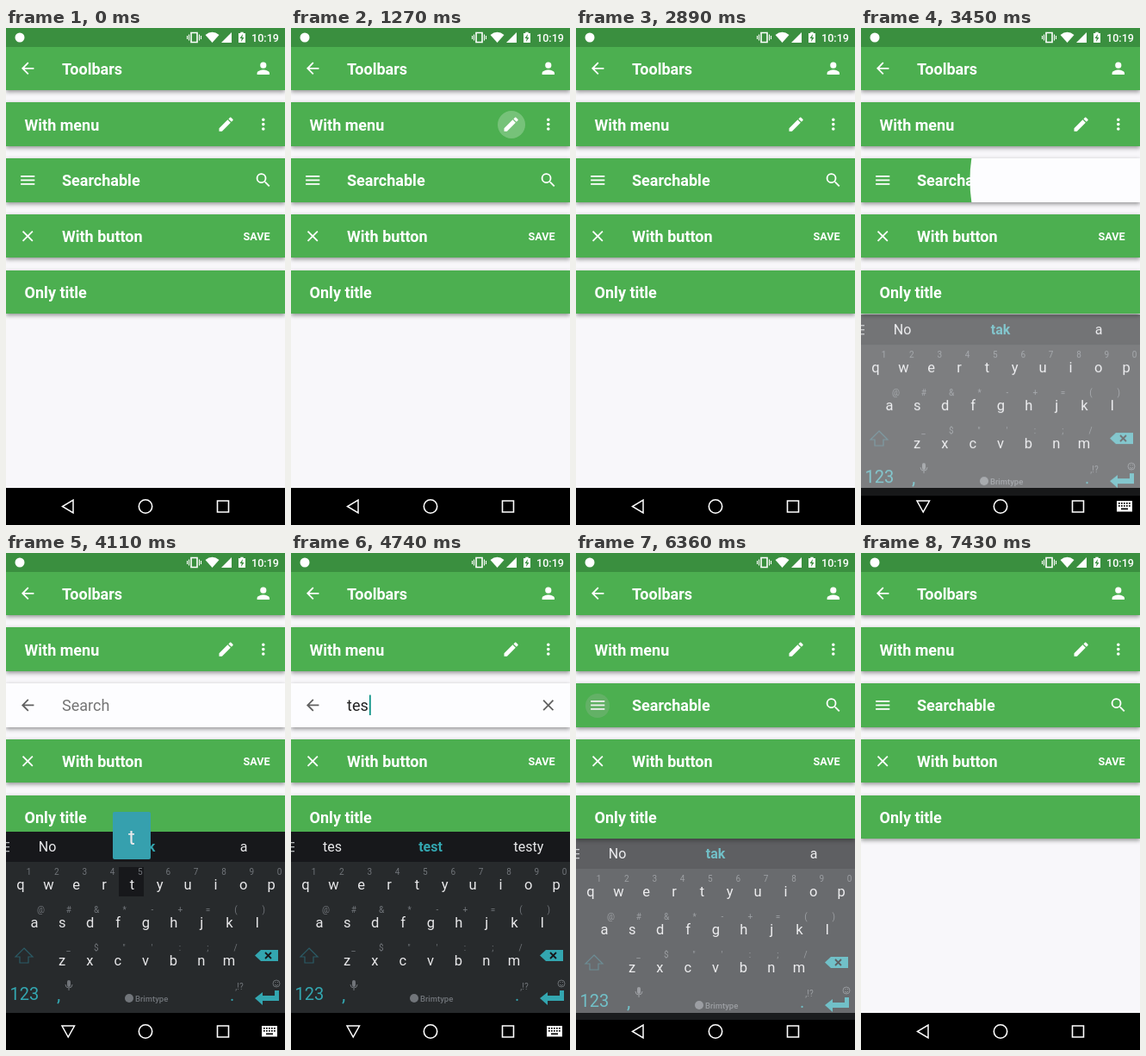
An HTML page with a canvas for the animation above (7.87 s loop, 324 px wide and 576 px high).

```html
<!DOCTYPE html>
<html lang="en">
<head>
<meta charset="utf-8">
<title>Toolbars</title>
<style>
html, body { margin: 0; width: 100%; height: 100%; overflow: hidden; background: #f8f7fa; }
canvas { display: block; width: 324px; height: 576px; }
</style>
</head>
<body>
<canvas width="324" height="576"></canvas>
<script>
const LOOP = 7870, W = 324, H = 576, NAV = 533;
const GREEN = '#4caf50', STATUS = '#3a8f3f', PAPER = '#f8f7fa', WHITE = '#fff', TEAL = '#33a6b0', INK = '#616161';
const screen = document.querySelector('canvas').getContext('2d');
const layer = Object.assign(document.createElement('canvas'), { width: W, height: H }).getContext('2d');
let ctx = screen;

const ICONS = {
  back: 'M20 11H7.83l5.59-5.59L12 4l-8 8 8 8 1.41-1.41L7.83 13H20z',
  person: 'M12 12a4 4 0 1 0 0-8a4 4 0 0 0 0 8zm0 2c-2.67 0-8 1.34-8 4v2h16v-2c0-2.66-5.33-4-8-4z',
  edit: 'M3 17.25V21h3.75L17.81 9.94l-3.75-3.75zM20.71 7.04c.39-.39.39-1.02 0-1.41l-2.34-2.34c-.39-.39-1.02-.39-1.41 0l-1.83 1.83 3.75 3.75z',
  more: 'M10 6a2 2 0 1 0 4 0a2 2 0 1 0-4 0zm0 6a2 2 0 1 0 4 0a2 2 0 1 0-4 0zm0 6a2 2 0 1 0 4 0a2 2 0 1 0-4 0z',
  menu: 'M3 18h18v-2H3zm0-5h18v-2H3zm0-7v2h18V6z',
  search: 'M15.5 14h-.79l-.28-.27A6.5 6.5 0 1 0 13.73 14.43l.27.28v.79l5 4.99L20.49 19zm-6 0a4.5 4.5 0 1 1 0-9a4.5 4.5 0 0 1 0 9z',
  close: 'M19 6.41L17.59 5 12 10.59 6.41 5 5 6.41 10.59 12 5 17.59 6.41 19 12 13.41 17.59 19 19 17.59 13.41 12z'
};
for (const name in ICONS) ICONS[name] = new Path2D(ICONS[name]);

// x, y, radius, press, release, end
const RIPPLES = [
  [25, 47, 16, 560, 720, 850],
  [299, 47, 16, 830, 990, 1120],
  [256, 112, 16, 1100, 1260, 1400],
  [299, 112, 27, 1590, 1800, 2150],
  [299, 177, 16, 3200, 3340, 3600],
  [25, 177, 14, 6090, 6290, 6700]
];

// key, x, y, press, release
const PRESSES = [
  ['t', 146, 384, 3960, 4130],
  ['e', 82, 384, 4270, 4400],
  ['s', 65, 428, 4540, 4690],
  ['t', 146, 384, 4820, 4945]
];
const CLEARED = 5550;
const HINTS = [['No', 'tak', 'a'], ['t', 'to', 'tak'], ['te', 'ten', 'też'], ['tes', 'test', 'testy'], ['testy', 'test', 'testu']];

const ROWS = [
  ['qwertyuiop', '1234567890', 17, 384],
  ['asdfghjkl', '@#&*-+=()', 33, 428],
  ['zxcvbnm', '_$"\':;/', 65, 472]
];

const clamp = v => Math.max(0, Math.min(1, v));
const part = (t, a, b) => clamp((t - a) / (b - a));
const easeOut = p => 1 - (1 - p) ** 3;
const smooth = p => p * p * (3 - 2 * p);
const within = (t, a, b) => t >= a && t < b;

function rect(x, y, w, h, color) {
  ctx.fillStyle = color;
  ctx.fillRect(x, y, w, h);
}

function text(s, x, y, size, color, weight = 400, align = 'left') {
  ctx.font = `${weight} ${size}px Roboto, sans-serif`;
  ctx.textAlign = align;
  ctx.fillStyle = color;
  ctx.fillText(s, x, y);
}

function disc(x, y, r, color) {
  ctx.fillStyle = color;
  ctx.beginPath();
  ctx.arc(x, y, r, 0, 7);
  ctx.fill();
}

function fillPath(d, color) {
  ctx.fillStyle = color;
  ctx.fill(new Path2D(d));
}

function strokePath(d, color, width) {
  ctx.strokeStyle = color;
  ctx.lineWidth = width;
  ctx.stroke(new Path2D(d));
}

function icon(name, x, y, color = WHITE) {
  ctx.save();
  ctx.translate(x - 10.8, y - 10.8);
  ctx.scale(.9, .9);
  ctx.fillStyle = color;
  ctx.fill(ICONS[name], 'evenodd');
  ctx.restore();
}

function clipped(path, draw) {
  ctx.save();
  ctx.beginPath();
  path();
  ctx.clip();
  draw();
  ctx.restore();
}

function shadow(blur, dy, alpha) {
  ctx.shadowColor = `rgba(0,0,0,${alpha})`;
  ctx.shadowBlur = blur;
  ctx.shadowOffsetY = dy;
}

function bar(i, title, left, ...right) {
  const top = 21.6 + i * 64.8, mid = top + 25.2;
  const y = Math.round(top), bottom = Math.round(top + 50.4);
  ctx.save();
  shadow(5, 2, .42);
  rect(0, y, W, bottom - y, GREEN);
  ctx.restore();
  if (left) icon(left, 25.2, mid);
  text(title, left ? 65 : 21.6, Math.round(mid + 6.9), 18, WHITE, 700);
  right.reverse().forEach((name, k) => icon(name, 298.8 - k * 43.2, mid));
}

function typedCount(t) {
  return t >= CLEARED ? 0 : PRESSES.filter(p => t >= p[4]).length;
}

function searchField(t) {
  const y = 176.4, word = 'test'.slice(0, typedCount(t));
  rect(0, 151, W, 51, '#fdfdff');
  icon('back', 25.2, y, INK);
  text(word || 'Search', 65, 183, 18, word ? '#212121' : '#757575');
  const caret = 65.2 + (word ? ctx.measureText(word).width + 1 : 0);
  if (word) icon('close', 298.8, y, INK);
  if (within(t, 3400, 3770) || within(t, 4130, 5360) || within(t, CLEARED, 6130))
    rect(caret, 164.5, 1.8, 23.5, '#0f9488');
}

function searchable(t) {
  const area = () => ctx.rect(0, 151, W, 51);
  const circle = (x, p) => () => ctx.arc(x, 176.4, 310 * smooth(p), 0, 7);
  const green = () => bar(2, 'Searchable', 'menu', 'search');
  const opening = part(t, 3330, 3555), closing = part(t, 6130, 6355);
  green();
  if (!opening || closing === 1) return;
  clipped(area, () => {
    clipped(circle(299, opening), () => searchField(t));
    if (closing) clipped(circle(25, closing), green);
  });
}

function ripples(t) {
  for (const [x, y, r, press, release, end] of RIPPLES) {
    if (!within(t, press, end)) continue;
    ctx.globalAlpha = .26 * (1 - part(t, release, end));
    disc(x, y, r * easeOut(part(t, press, release)), press === 6090 ? '#bbb' : WHITE);
  }
  ctx.globalAlpha = 1;
  if (within(t, 7040, 7430)) clipped(() => ctx.roundRect(260, 225, 62, 35, 2), () => {
    ctx.globalAlpha = .24 * (1 - part(t, 7220, 7430));
    disc(291, 242, 36 * easeOut(part(t, 7040, 7250)), WHITE);
  });
}

function popup(t) {
  if (!within(t, 1840, 2890)) return;
  const p = easeOut(part(t, 1840, 2150)), w = 176 * (.2 + .8 * p), h = 87 * p, x = W - w, y = 123;
  ctx.save();
  ctx.globalAlpha = part(t, 1840, 1940) * (1 - part(t, 2710, 2890));
  ctx.save();
  shadow(14, 5, .42);
  ctx.fillStyle = '#fdfdff';
  ctx.beginPath();
  ctx.roundRect(x, y, w, h, 2);
  ctx.fill();
  ctx.restore();
  clipped(() => ctx.rect(x, y, w, h), () => {
    if (t >= 2540) clipped(() => ctx.rect(148, y, 176, 43.5), () =>
      disc(236, 145, 95 * easeOut(part(t, 2540, 2760)), 'rgba(0,0,0,.1)'));
    text('Item 1', 162, 150, 14.4, '#212121');
    text('Item 2', 162, 193, 14.4, '#212121');
  });
  ctx.restore();
}

function keys(t) {
  const KEY = '#e8e8ea', DIM = '#71757a', STRIP = '#17181b';
  rect(0, 323, W, 35, STRIP);
  rect(0, 358, W, 175, '#272a2c');

  for (let y = 335; y < 348; y += 5) rect(0, y, 4, 1.3, '#b5b8ba');
  HINTS[typedCount(t)].forEach((s, i) => {
    const mid = i === 1;
    text(s, 48 + i * 114, 346, 16, mid ? TEAL : KEY, mid ? 700 : 400, 'center');
  });

  const pressed = PRESSES.find(p => within(t, p[3], p[4]));
  if (pressed) rect(pressed[1] - 15, pressed[2] - 20, 29, 34, STRIP);
  for (const [letters, extras, x0, y] of ROWS)
    [...letters].forEach((letter, i) => {
      const x = x0 + i * 32.35;
      text(letter, x, y + 6, 16.5, KEY, 400, 'center');
      text(extras[i], x + (y === 384 ? 9.5 : 7.5), y - 11, 10, DIM, 400, 'center');
    });

  strokePath('M21 458L31 468H26V475H16V468H11Z', '#2b5b66', 1.2);
  fillPath('M289 466.5L296 460H316V473H296Z', TEAL);
  strokePath('M301 463L308 470M308 463L301 470', STRIP, 1.8);

  text('123', 4.5, 518, 20, TEAL);
  text(',', 59, 519, 22, TEAL);
  text('.', 260, 519, 20, TEAL);
  text(',!?', 271, 506, 10, DIM, 400, 'center');
  fillPath('M71 497a2 2 0 0 1 4 0v4a2 2 0 0 1-4 0z', DIM);
  strokePath('M69 500a4 4 0 0 0 8 0M73 504v3', DIM, 1);
  disc(143, 516, 5, DIM);
  text('Brimtype', 150, 519.5, 9.5, DIM, 500);
  strokePath('M318 499a4 4 0 1 0-8 0a4 4 0 1 0 8 0M312 500q2 3 4 0M312.5 497.5h1M315 497.5h1', DIM, .9);
  fillPath('M289 516L298 509V513H312V507H317V519H298V524Z', TEAL);

  if (pressed) {
    const [letter, x, y] = pressed;
    ctx.fillStyle = '#36a0ae';
    ctx.beginPath();
    ctx.roundRect(x - 22, y - 84, 44, 55, 2);
    ctx.fill();
    text(letter, x, y - 46, 24, '#e8e8ea', 400, 'center');
  }
}

// The keyboard fades as one layer, over the navigation bar.
function keyboard(t) {
  const enter = easeOut(part(t, 3400, 3600)), exit = part(t, 6310, 6470);
  if (!enter || exit === 1) return;
  ctx = layer;
  ctx.clearRect(0, 0, W, H);
  keys(t);
  ctx = screen;
  ctx.globalAlpha = enter * (1 - exit);
  ctx.drawImage(layer.canvas, 0, (1 - enter) * 22 + exit * 25);
  ctx.globalAlpha = 1;
}

function statusBar() {
  rect(0, 0, W, 22, STATUS);
  disc(16, 11, 5.5, WHITE);
  strokePath('M215 5.5H222V16.5H215Z', WHITE, 1.6);
  strokePath('M212.5 7.5V14.5M224.5 7.5V14.5M210.5 9V13M226.5 9V13', WHITE, 1.1);
  fillPath('M231.5 8Q239.5 1.5 247.5 8L239.5 17Z', WHITE);
  fillPath('M262 5V17H250Z', WHITE);
  fillPath('M270 6H272.3V4.8H275.7V6H278V17H270Z', WHITE);
  fillPath('M275 7L271.5 12H273.7L273 16L276.5 11H274.3Z', STATUS);
  text('10:19', 285, 15.6, 12.6, WHITE, 500);
}

function navBar(t) {
  const typing = within(t, 3400, 6330);
  rect(0, NAV, W, H - NAV, '#000');
  strokePath(typing ? 'M65 548H79.5L72.2 561Z' : 'M78 547V562L65.5 554.5Z', WHITE, 1.5);
  strokePath('M169.7 554.5a7.7 7.7 0 1 0-15.4 0a7.7 7.7 0 1 0 15.4 0', WHITE, 1.6);
  strokePath('M245.5 548H258.5V561H245.5Z', WHITE, 1.6);
  if (!typing) return;
  rect(297, 548, 18, 12.5, WHITE);
  for (let i = 0; i < 10; i++) rect(299 + i % 5 * 3, 550 + (i / 5 | 0) * 3, 1.7, 1.7, '#000');
  rect(302, 556.5, 8, 1.7, '#000');
}

function draw(t) {
  rect(0, 0, W, H, PAPER);
  bar(0, 'Toolbars', 'back', 'person');
  statusBar();
  bar(1, 'With menu', '', 'edit', 'more');
  searchable(t);
  bar(3, 'With button', 'close');
  text('SAVE', 306.5, 246, 12.6, WHITE, 700, 'right');
  bar(4, 'Only title');
  ripples(t);
  popup(t);
  navBar(t);
  keyboard(t);
}

const start = performance.now();
function tick() {
  draw((performance.now() - start) % LOOP);
  requestAnimationFrame(tick);
}
tick();
</script>
</body>
</html>
```
